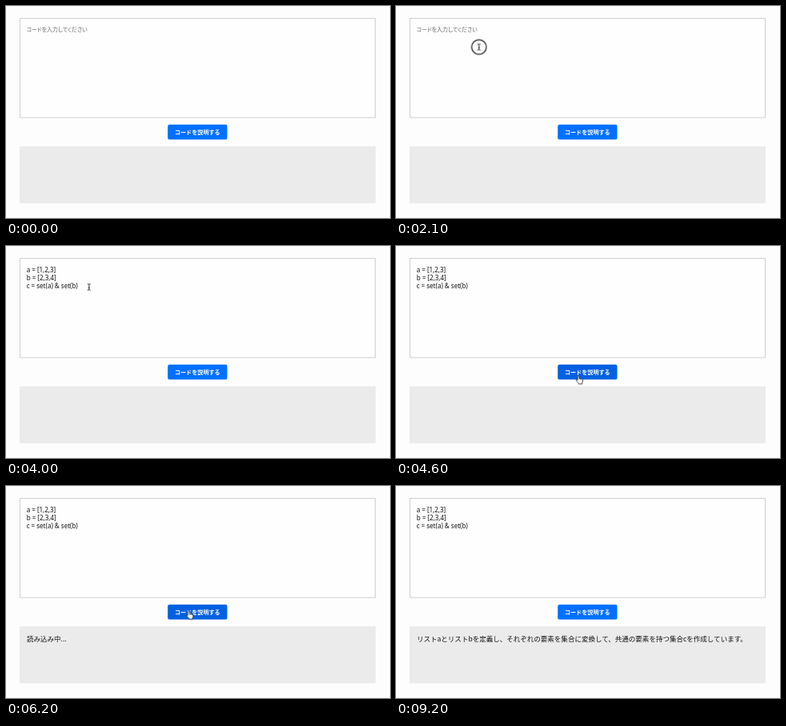
These frames come from a looping animation (480x266 px, 9700 ms). An HTML page:

```html
<!DOCTYPE html>
<html lang="ja">
<head>
<meta charset="utf-8">
<title>コードを説明する</title>
<style>
  html, body { margin: 0; width: 100%; height: 100%; overflow: hidden; background: #fdfdfd; }
  svg { display: block; width: 100%; height: 100%; }
  text { font-family: "Noto Sans CJK JP", "Noto Sans CJK", sans-serif; fill: #111; white-space: pre; }
  .hint { font-size: 7px; font-feature-settings: "palt"; fill: #6a6a6a; }
  .code text { font: 8px "Noto Sans", "Open Sans", sans-serif; }
  .label { font-size: 7.1px; font-weight: 700; fill: #fff; text-anchor: middle; }
  .answer text { font-size: 8.53px; }

  /* Toggles jump between states; the pointer glides. */
  .toggle, .button { animation: 9.7s step-end infinite; }
  .toggle { opacity: 0; }
  .hint { animation-name: hint; }
  .focus { animation-name: focus; }
  .code { animation-name: code; }
  .caret { animation-name: caret; }
  .button { animation-name: hover; }
  .loading { animation-name: loading; }
  .result { animation-name: result; }
  .pointer { animation: pointer 9.7s linear infinite; }
  .beam { animation-name: beam; }
  .arrow { animation-name: arrow; }
  .hand { animation-name: hand; }
  .ring { animation-name: ring; }

  @keyframes hint { 0% { opacity: 1 } 27.835%, 100% { opacity: 0 } }
  @keyframes code { 0% { opacity: 0 } 27.835%, 100% { opacity: 1 } }
  @keyframes focus { 0% { opacity: 0 } 22.68% { opacity: 1 } 40.206%, 100% { opacity: 0 } }
  @keyframes caret { 0% { opacity: 0 } 27.835% { opacity: 1 } 34.02%, 100% { opacity: 0 } }
  @keyframes hover { 0% { fill: #0070ff } 47.422% { fill: #0061e0 } 90.721%, 100% { fill: #0070ff } }
  @keyframes loading { 0% { opacity: 0 } 54.639% { opacity: 1 } 78.35%, 100% { opacity: 0 } }
  @keyframes result { 0% { opacity: 0 } 78.35%, 100% { opacity: 1 } }
  @keyframes beam { 0% { opacity: 0 } 13.402% { opacity: 1 } 45.36%, 100% { opacity: 0 } }
  @keyframes arrow {
    0% { opacity: 0 } 45.36% { opacity: 1 } 47.422% { opacity: 0 }
    90.721% { opacity: 1 } 92.783%, 100% { opacity: 0 }
  }
  @keyframes hand { 0% { opacity: 0 } 47.422% { opacity: 1 } 90.721%, 100% { opacity: 0 } }
  @keyframes ring {
    0% { opacity: 0 } 20.618% { opacity: 1 } 22.68% { opacity: 0 }
    53.608% { opacity: 1 } 55.67%, 100% { opacity: 0 }
  }
  @keyframes pointer {
    0%, 15.979% { transform: translate(160px, 128px); animation-timing-function: ease-out }
    19.587%, 43.298% { transform: translate(103.7px, 51.5px) }
    44.329% { transform: translate(150px, 115px) }
    45.36% { transform: translate(222px, 205px) }
    46.391% { transform: translate(229px, 182px) }
    47.422% { transform: translate(228px, 163.5px) }
    48.453%, 89.69% { transform: translate(228.5px, 157.5px) }
    90.721%, 100% { transform: translate(229px, 178px) }
  }
</style>
</head>
<body>
<svg viewBox="0 0 480 266">
  <rect x="17.5" y="15.5" width="444" height="124.5" fill="#fefefe" stroke="#cfcfcf"/>
  <rect class="toggle focus" x="17.3" y="15.8" width="444.4" height="124" rx="1" fill="none" stroke="#2467b8" stroke-width="1.6"/>
  <text class="toggle hint" x="25.5" y="32.4">コードを入力してください</text>
  <g class="toggle code">
    <text x="25.7" y="32.7">a = [1,2,3]</text>
    <text x="25.7" y="42.7">b = [2,3,4]</text>
    <text x="25.7" y="52.7">c = set(a) &amp; set(b)</text>
  </g>
  <rect class="toggle caret" x="90.2" y="45.5" width=".8" height="8.5" fill="#111"/>

  <rect class="button" x="202.2" y="148.8" width="74.3" height="18.8" rx="2.2" fill="#0070ff"/>
  <text class="label" x="239.3" y="160.7">コードを説明する</text>

  <rect x="17" y="176" width="445" height="71.5" fill="#ebebeb"/>
  <g class="answer">
    <text class="toggle loading" x="26" y="194.8">読み込み中...</text>
    <text class="toggle result" x="26" y="194.8">リストaとリストbを定義し、それぞれの要素を集合に変換して、共通の要素を持つ集合cを作成しています。</text>
  </g>

  <g class="pointer">
    <circle class="toggle ring" r="9.2" fill="none" stroke="#111" stroke-width="1.2"/>
    <path class="toggle beam" d="M-2-3.8Q-.2-3.8 0-3Q.2-3.8 2-3.8M0-3V3M-2 3.8Q-.2 3.8 0 3Q.2 3.8 2 3.8M-1 .9H1" fill="none" stroke="#111" stroke-width=".9"/>
    <path class="toggle arrow" d="M0 0V8.6L2 6.8L3.3 9.8L4.7 9.2L3.4 6.3H6.1Z" fill="#111" stroke="#fff" stroke-width=".7"/>
    <path class="toggle hand" d="M-1 .6Q-1-.5 0-.5T1 .6V3.3Q1.9 2.5 2.6 3.5Q3.5 2.8 4.1 3.9Q5.4 3.5 5.5 5Q5.6 7.2 4.6 8.3V9.7H.2V8.6Q-1.4 7.2-2.7 5.4Q-3.2 4.3-2.2 4.2Q-1.6 4.3-1 5Z" fill="#fff" stroke="#111" stroke-width=".8" stroke-linejoin="round"/>
  </g>
</svg>
</body>
</html>
```
